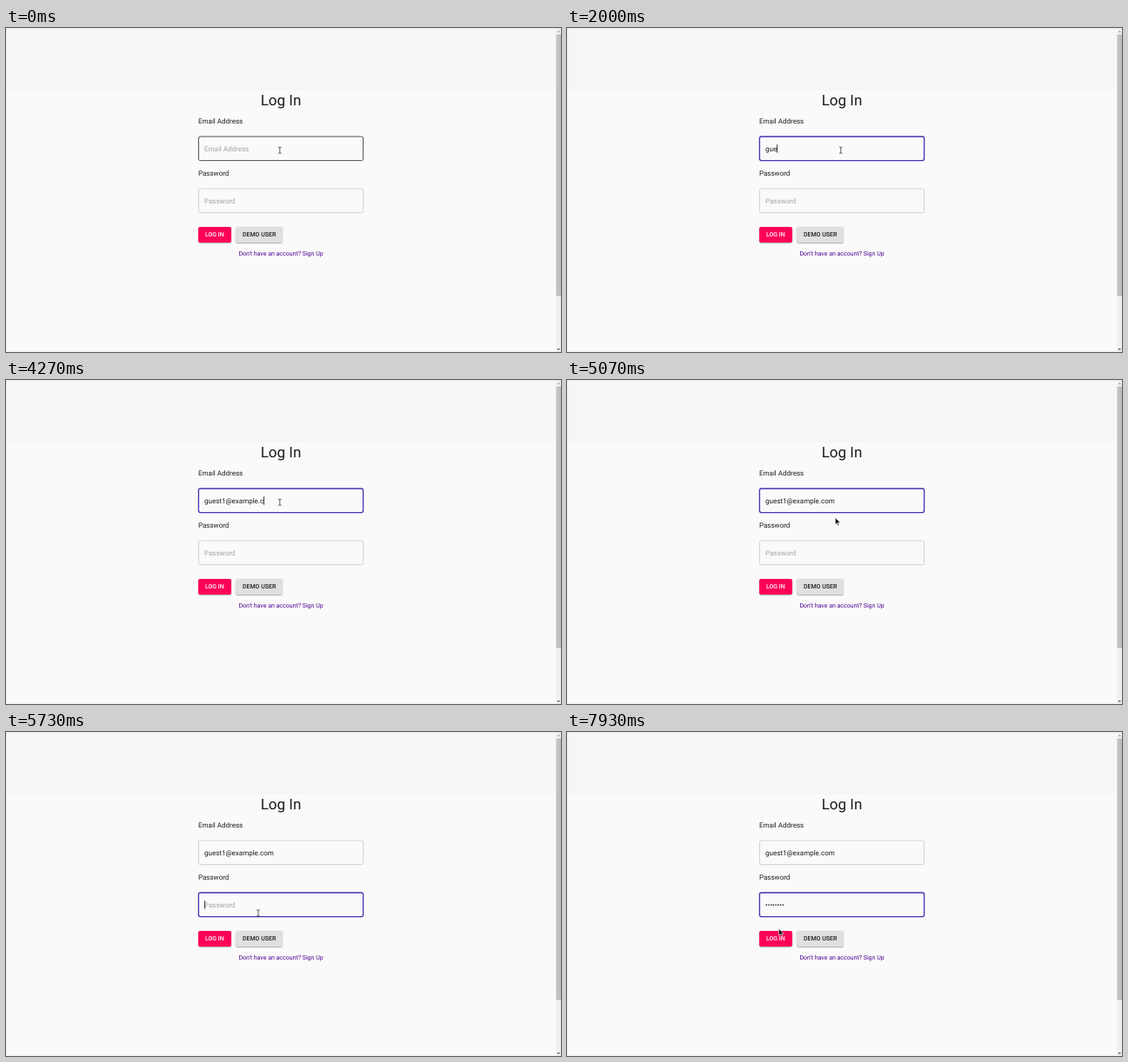
Recreate the animation shown at these times as an HTML page. Size 638 px wide and 373 px high, loop 8000 ms.

```html
<!DOCTYPE html>
<html lang="en">
<head>
<meta charset="utf-8">
<title>Log In</title>
<style>
  html, body { margin: 0; width: 100%; height: 100%; overflow: hidden; background: #fafafa; }
  svg { position: absolute; left: 0; top: 0; }
  text { font: 8px Roboto, sans-serif; fill: #1c1c1c; text-rendering: geometricPrecision; white-space: pre; }
  .title { font-size: 17px; }
  .caps { font-size: 7px; font-weight: 500; }
  .link { font-size: 7px; fill: #4b0091; }
  .btn { position: absolute; top: 228.8px; height: 18.2px; border-radius: 2px;
    box-shadow: 0 1.5px .5px -1px #0003, 0 1px 1px #0002, 0 .5px 2.5px #0002; }
  .edge { position: absolute; inset: 0; box-shadow: inset 0 0 3px #00000014; }
</style>
</head>
<body>
<div class="btn" style="left:221px;width:38px;background:#ff0058"></div>
<div class="btn" style="left:264px;width:54.4px;background:#e0e0e0"></div>
<svg width="638" height="373">
  <rect width="632" height="71.5" fill="#f7f5f6"/>
  <rect x="632" width="6" height="373" fill="#f1f1f1"/>
  <rect x="632.5" y="7.5" width="5.5" height="301" fill="#c1c1c1"/>
  <path d="M633.5 5l1.7-2 1.7 2z" fill="#a3a3a3"/>
  <path d="M633.5 369l1.7 2 1.7-2z" fill="#505050"/>
  <text class="title" x="316" y="88.8" text-anchor="middle">Log In</text>
  <text x="221" y="109.7">Email Address</text>
  <text x="221" y="169.7">Password</text>
  <text class="caps" x="228.9" y="240.4" style="fill:#fff">LOG IN</text>
  <text class="caps" x="271.9" y="240.4">DEMO USER</text>
  <text class="link" x="316" y="262.4" text-anchor="middle">Don't have an account? Sign Up</text>
  <g id="fields"></g>
  <g id="cursor">
    <path id="beam" fill="none" stroke="#333" stroke-width=".8" d="M-1.8-3.6Q0-3.6 0-2.8Q0-3.6 1.8-3.6M0-3V3M-1.8 3.6Q0 3.6 0 2.8Q0 3.6 1.8 3.6"/>
    <path id="arrow" fill="#111" stroke="#fff" stroke-width=".6" d="M0 0V8.2L1.9 6.5L3.1 9.3L4.4 8.7L3.2 6H5.8Z"/>
  </g>
</svg>
<div class="edge"></div>
<script>
const LOOP = 8000, STEP = 1000 / 15, SLACK = 5;
const $ = id => document.getElementById(id);
const NS = 'http://www.w3.org/2000/svg';
const IDLE = [204, 204, 204], HOVER = [50, 50, 50], FOCUS = [70, 50, 176];

function add(tag, attrs) {
  const el = $('fields').appendChild(document.createElementNS(NS, tag));
  for (const k in attrs) el.setAttribute(k, attrs[k]);
  return el;
}

function makeField(y, hint, value, focus, blur, keys, caretOff) {
  return {
    y, hint, value, focus, blur, keys, caretOff,
    box: add('rect', { x: 221.4, y: y + .4, width: 189.2, height: 27.6, rx: 2, fill: 'none' }),
    text: add('text', { x: 228, y: y + 17.2 }),
    caret: add('rect', { y: y + 9.6, width: .8, height: 9.4, fill: '#111' })
  };
}

const fields = [
  makeField(124.6, 'Email Address', 'guest1@example.com', 533, 5467,
    [1733, 1800, 2000, 2133, 2200, 2267, 2400, 2533, 3133, 3600, 3733, 3867, 3933, 4067, 4133, 4267, 4400, 4533],
    [1200, 5000]),
  makeField(184.6, 'Password', '•'.repeat(8), 5400, LOOP,
    [6400, 6533, 6667, 6800, 7000, 7067, 7133, 7267], [6067, 7733])
];

const clamp = x => Math.max(0, Math.min(1, x));
const ramp = (t, from, to) => clamp((t - from) / (to - from));
const ease = p => p * p * (3 - 2 * p);
const mix = (a, b, p) => a + (b - a) * p;
const mixColor = (a, b, p) => `rgb(${a.map((v, i) => Math.round(mix(v, b[i], p)))})`;
const last = (times, t) => Math.max(-1, ...times.filter(s => s <= t + SLACK));
const hits = (f, y) => y > f.y && y < f.y + 28;

function pointer(t) {
  const a = ease(ramp(t, 4933, 5333)), b = ease(ramp(t, 7667, 7933));
  return [mix(mix(314.8, 290, a), 243.4, b), mix(mix(140.7, 208.4, a), 226.2, b)];
}

function drawField(f, t, py) {
  const count = f.keys.filter(k => k <= t + SLACK).length;
  const active = ramp(t, f.focus, f.focus + 267) * (1 - ramp(t, f.blur, f.blur + 267));
  f.box.setAttribute('stroke', mixColor(hits(f, py) ? HOVER : IDLE, FOCUS, clamp(active * 1.5)));
  f.box.setAttribute('stroke-width', mix(.85, 1.3, active));
  f.text.textContent = count ? f.value.slice(0, count) : f.hint;
  f.text.style.fill = count ? '#1c1c1c' : '#a3a3a3';
  const end = count ? f.text.getComputedTextLength() : 0;
  f.caret.setAttribute('x', 228 + end);
  const shown = last([f.focus + 67, ...f.keys], t) > last(f.caretOff, t);
  f.caret.style.display = shown ? '' : 'none';
}

function draw(now) {
  const t = Math.floor((now % LOOP + SLACK) / STEP) * STEP;
  const [px, py] = pointer(t);
  for (const f of fields) drawField(f, t, py);
  const inside = fields.some(f => hits(f, py));
  $('beam').style.display = inside ? '' : 'none';
  $('arrow').style.display = inside ? 'none' : '';
  $('cursor').setAttribute('transform', `translate(${px} ${py})`);
}

const start = performance.now();
function tick() {
  draw(performance.now() - start);
  requestAnimationFrame(tick);
}
tick();
</script>
</body>
</html>
```
